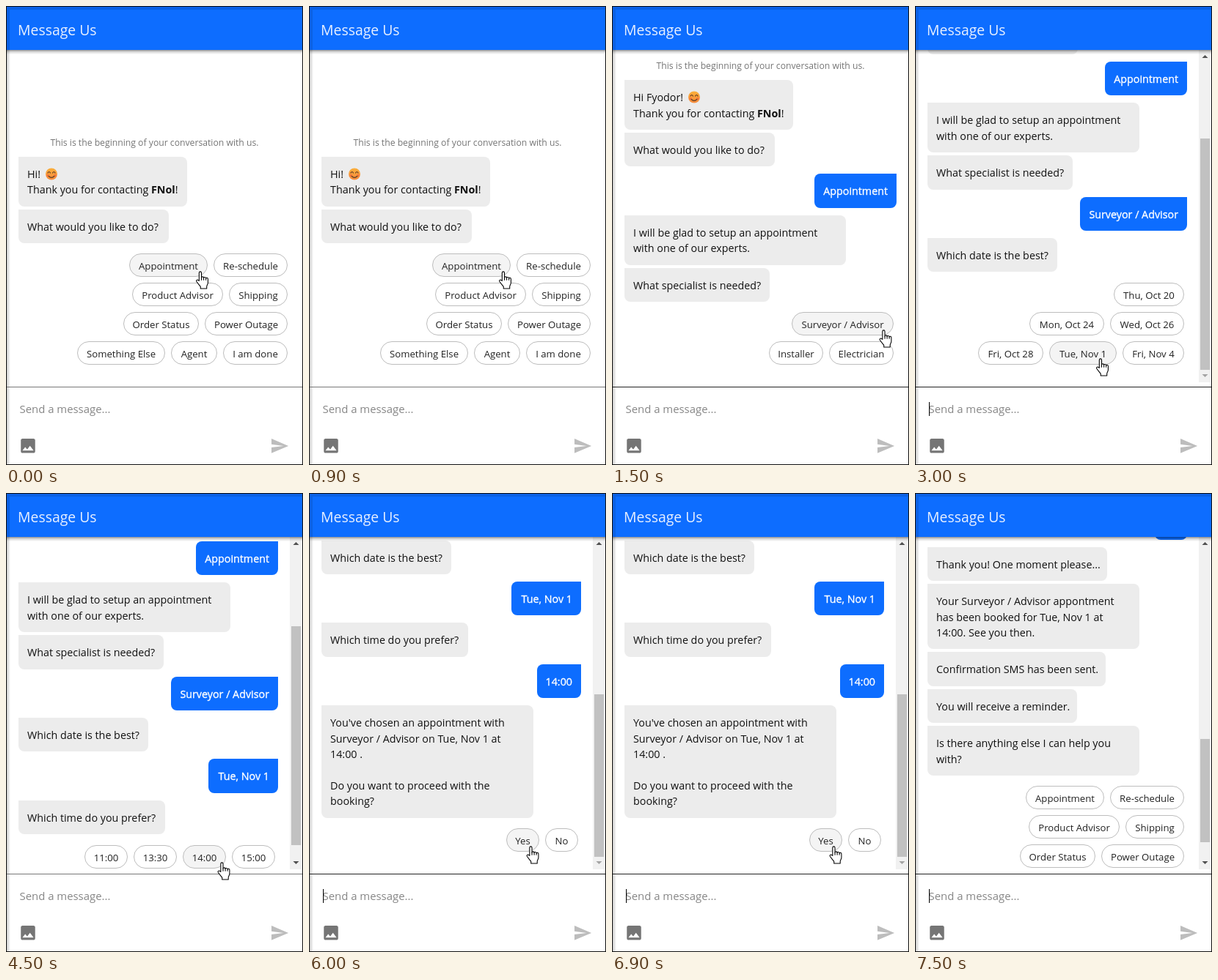
Write an HTML page that moves like this. It is 405 by 627 pixels and loops after 8000 ms.

```html
<!DOCTYPE html>
<html lang="en">
<head>
<meta charset="utf-8">
<title>Message Us</title>
<style>
  html, body { margin: 0; width: 100%; height: 100%; overflow: hidden; background: #fff; }
  svg { display: block; width: 100%; height: 100%; }
  text { font: 14.3px "Open Sans", "Noto Sans", sans-serif; fill: #111; }
  .title { font-size: 19.4px; fill: #e8f0ff; }
  .note { font-size: 12.2px; fill: #757575; text-anchor: middle; }
  .mine { fill: #fff; stroke: #fff; stroke-width: .35; text-anchor: end; }
  .chip { font-size: 13.2px; fill: #222; text-anchor: middle; }
  .hint { font-size: 14.9px; fill: #868686; }
</style>
</head>
<body>
<svg viewBox="0 0 405 627" xmlns="http://www.w3.org/2000/svg">
  <defs>
    <clipPath id="view"><rect x="1" y="60" width="403" height="456"/></clipPath>
    <linearGradient id="drop" x2="0" y2="1">
      <stop stop-color="#000" stop-opacity=".42"/>
      <stop offset=".45" stop-color="#000" stop-opacity=".15"/>
      <stop offset="1" stop-color="#000" stop-opacity="0"/>
    </linearGradient>
    <linearGradient id="side">
      <stop stop-color="#000" stop-opacity=".2"/>
      <stop offset="1" stop-color="#000" stop-opacity="0"/>
    </linearGradient>
    <linearGradient id="face" x2="0" y2="1">
      <stop stop-color="#fbb03b"/>
      <stop offset="1" stop-color="#f58a3c"/>
    </linearGradient>
  </defs>
  <rect width="405" height="627" fill="#fff"/>
  <g id="chat" clip-path="url(#view)"></g>
  <rect x="1" y="60" width="403" height="6" fill="url(#drop)"/>
  <rect x="1" y="60" width="5" height="566" fill="url(#side)"/>
  <rect x="1" y="1" width="403" height="59" fill="#0d6dff"/>
  <path d="M1 1H404V5H5V60H1z" fill="#000" opacity=".1"/>
  <text class="title" x="16" y="40">Message Us</text>
  <path id="rule" d="M1 520.5H404"/>
  <text class="hint" x="18.5" y="556">Send a message...</text>
  <path id="caret" d="M19.5 541V560" stroke="#000"/>
  <path transform="translate(17 587.8) scale(1.083)" fill="#757575" d="M21 19V5c0-1.1-.9-2-2-2H5c-1.1 0-2 .9-2 2v14c0 1.1.9 2 2 2h14c1.1 0 2-.9 2-2zM8.500 13.500l2.500 3L14.500 12l4.500 6H5z"/>
  <path transform="translate(359.8 587.7) scale(1.1)" fill="#bdbdbd" d="M2 21L23 12 2 3v7l15 2-15 2z"/>
  <rect x=".5" y=".5" width="404" height="626" fill="none" stroke="#111"/>
  <g id="hand" stroke="#000" stroke-linejoin="round" stroke-linecap="round">
    <path fill="#fff" d="M4.500 12.500V2.500c0-2.200 3-2.200 3 0V8.500c0-1.600 2.900-1.500 2.900.3c.2-1.400 2.800-1.200 2.800.6c.3-1.300 2.600-1 2.600.8V15c0 2-1.600 3.500-1.600 5v2.500H6.300V20C5 18 2.500 15.500 1.200 13.400c-.9-1.600.9-2.800 2.100-1.700z"/>
    <path fill="none" d="M7.500 8.500V11.500M10.400 9V11.500M13.200 9.600V11.500"/>
  </g>
</svg>
<script>
const $ = id => document.getElementById(id);
const STEP = 1500, LOOP = 8000;
const LINE = 21.4, PAD = 25, GAP = 4, TURN_GAP = 10;

// Messages: w = bubble width, mine = sent by the visitor
const bot = (w, ...lines) => ({ w, lines });
const me = (w, text) => ({ w, lines: [text], mine: true });

const thanks = 'Thank you for contacting <tspan font-weight="700">FNol</tspan>!';
const hello = { ...bot(230, 'Hi!', thanks), smile: 62 };
const helloName = { ...bot(230, 'Hi Fyodor!', thanks), smile: 112 };
const what = bot(205, 'What would you like to do?');
const appt = me(112, 'Appointment');
const glad = w => bot(w, 'I will be glad to setup an appointment', 'with one of our experts.');
const who = bot(198, 'What specialist is needed?');
const advisor = me(146, 'Surveyor / Advisor');
const date = bot(177, 'Which date is the best?');
const day = me(95, 'Tue, Nov 1');
const time = bot(200, 'Which time do you prefer?');

const menu = [
  [['Appointment', 107], ['Re-schedule', 101]],
  [['Product Advisor', 124], ['Shipping', 80]],
  [['Order Status', 103], ['Power Outage', 113]],
  [['Something Else', 120], ['Agent', 63], ['I am done', 88]]
];

// top = first bubble, chipY = first chip row, thumb = scrollbar thumb range
const scenes = [
  { note: 191, top: 206, list: [hello, what],
    chipY: 338, chips: menu, hot: 'Appointment', hand: [258.5, 362] },
  { note: 86, top: 101.2, list: [helloName, what, appt, glad(302), who],
    chipY: 418, chips: [[['Surveyor / Advisor', 139]], [['Installer', 74], ['Electrician', 88]]],
    hot: 'Surveyor / Advisor', hand: [364, 442], dark: true },
  { top: 19.6, list: [what, appt, glad(289), who, advisor, date],
    chipY: 378, chips: [
      [['Thu, Oct 20', 96]],
      [['Mon, Oct 24', 102], ['Wed, Oct 26', 101]],
      [['Fri, Oct 28', 89], ['Tue, Nov 1', 92], ['Fri, Nov 4', 84]]],
    hot: 'Tue, Nov 1', hand: [246.5, 481], dark: true, caret: true, thumb: [181, 497], end: true },
  { top: 66, list: [appt, glad(289), who, advisor, date, day, time],
    chipY: 481, chips: [['11:00', '13:30', '14:00', '15:00'].map(t => [t, 59])],
    hot: '14:00', hand: [288, 504], thumb: [182, 481] },
  { top: 64.6, list: [date, day, time, me(60, '14:00'),
      bot(289, "You've chosen an appointment with", 'Surveyor / Advisor on Tue, Nov 1 at', '14:00 .', '',
        'Do you want to proceed with the', 'booking?')],
    chipY: 458, chips: [[['Yes', 45], ['No', 45]]],
    hot: 'Yes', hand: [296, 482], dark: true, caret: true, thumb: [275, 497], end: true },
  { top: 17.4, list: [me(44, 'Yes'), bot(245, 'Thank you! One moment please...'),
      bot(289, 'Your Surveyor / Advisor appontment', 'has been booked for Tue, Nov 1 at', '14:00. See you then.'),
      bot(243, 'Confirmation SMS has been sent.'), bot(204, 'You will receive a reminder.'),
      bot(289, 'Is there anything else I can help you', 'with?')],
    chipY: 400, chips: menu.slice(0, 3), dark: true, caret: true, thumb: [336, 477] }
];

const text = (x, y, s, cls = '') => `<text class="${cls}" x="${x}" y="${y}">${s}</text>`;
const height = m => PAD + LINE * m.lines.length;

const smiley = (x, y) => `<g transform="translate(${x} ${y})" fill="none" stroke="#5b3a25" stroke-linecap="round">
  <circle r="8" fill="url(#face)" stroke="none"/>
  <g fill="#f2553d" stroke="none" opacity=".5"><circle cx="-5" cy="2" r="1.8"/><circle cx="5" cy="2" r="1.8"/></g>
  <path stroke-width="1.2" d="M-5 -1.500q1.700 -3 3.400 0M1.600 -1.500q1.700 -3 3.400 0M-3.800 3q3.800 3.800 7.600 0"/></g>`;

// Rounded box whose top corner on the sender's side is square
function bubble(m, y, right) {
  const r = 8, x = m.mine ? right - m.w : 17, e = x + m.w;
  const t = Math.round(y), b = Math.round(y + height(m));
  const [tl, tr] = m.mine ? [r, 0] : [0, r];
  const arc = (k, dx, dy) => `a${k} ${k} 0 0 1 ${k * dx} ${k * dy}`;
  const box = `<path fill="${m.mine ? '#0d6dff' : '#ececec'}" d="M${x + tl} ${t}H${e - tr}${arc(tr, 1, 1)}V${b - r}${arc(r, -1, 1)}H${x + r}${arc(r, -1, -1)}V${t + tl}${arc(tl, 1, -1)}z"/>`;
  const lines = m.lines.map((s, i) =>
    text(m.mine ? e - 12 : 29, Math.round(y + 29 + i * LINE), s, m.mine ? 'mine' : ''));
  return box + lines.join('') + (m.smile ? smiley(m.smile, t + 23.5) : '');
}

function chipRow(row, y, right, hot) {
  let x = right + 8;
  return [...row].reverse().map(([s, w]) => {
    x -= w + 8;
    return `<rect x="${x + .5}" y="${y + .5}" width="${w - 1}" height="31" rx="15.5"
      fill="${s === hot ? '#f4f4f4' : '#fff'}" stroke="#bdbdbd"/>`
      + text(x + w / 2, y + 22, s, 'chip');
  }).join('');
}

const scrollbar = ([a, b], end) => `<rect x="387" y="60" width="17" height="454" fill="#f1f1f1"/>
  <rect x="389" y="${a}" width="13" height="${b - a}" fill="#c1c1c1"/>
  <path fill="#505050" d="M391.500 71h8l-4 -4z"/>
  <path fill="${end ? '#a3a3a3' : '#505050'}" d="M391.500 503h8l-4 4z"/>`;

function draw(s) {
  const right = s.thumb ? 371 : 388;
  let y = s.top, out = s.note ? text(202.5, s.note, 'This is the beginning of your conversation with us.', 'note') : '';
  s.list.forEach((m, i) => {
    out += bubble(m, y, right);
    const next = s.list[i + 1];
    y += height(m) + (next && next.mine === m.mine ? GAP : TURN_GAP);
  });
  s.chips.forEach((row, i) => out += chipRow(row, s.chipY + i * 40, right - 4, s.hot));
  if (s.thumb) out += scrollbar(s.thumb, s.end);
  $('chat').innerHTML = out;
  $('rule').setAttribute('stroke', s.dark ? '#222' : '#777');
  $('caret').style.display = s.caret ? '' : 'none';
  $('hand').style.display = s.hand ? '' : 'none';
  if (s.hand) $('hand').setAttribute('transform', `translate(${s.hand}) scale(1.07)`);
}

let shown = -1;
const start = performance.now();
function tick() {
  const i = Math.floor((performance.now() - start) % LOOP / STEP);
  if (i !== shown) draw(scenes[shown = i]);
  requestAnimationFrame(tick);
}
tick();
</script>
</body>
</html>
```
